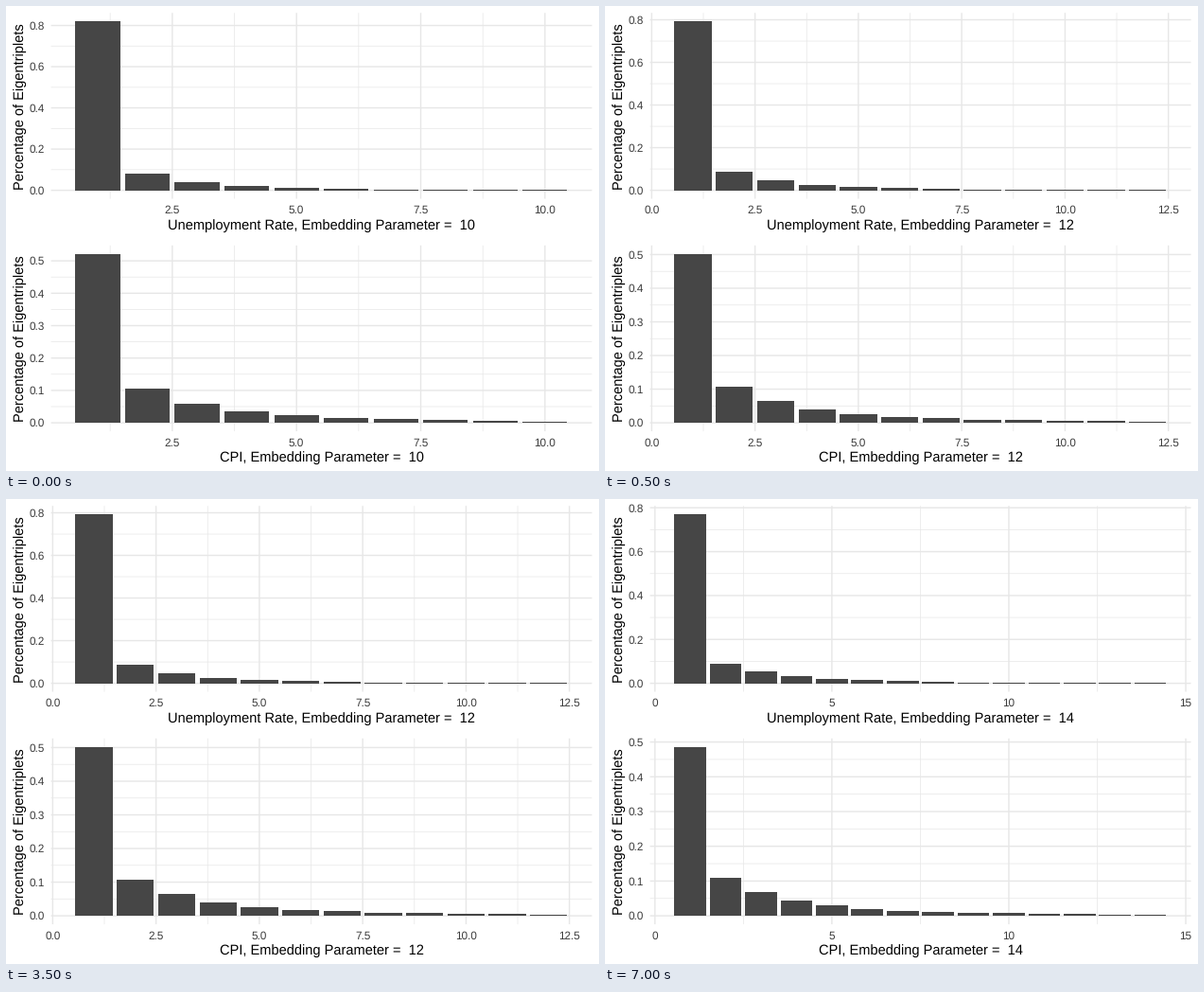
Recreate the animation shown at these times as a matplotlib script. Size 627x491 px, loop 8 s.

```python
import matplotlib
import matplotlib.pyplot as plt
import numpy as np
from matplotlib.animation import FuncAnimation
from matplotlib.patches import Rectangle

W, H, DPI = 627, 491, 64
PT = 72 / DPI                      # points per pixel
LEFT, SPAN = 73.4, 520.1           # left edge and full width of the bars
PANEL_L, PANEL_R = 47.6, 619.5
BAR_H, PAD = 178.4, 8.92           # tallest bar, panel padding
BAR, GRID, TICK = "#464646", "#e7e7e7", "#3c3c3c"

# head and second: first two shares at n = 10, each with its power of n;
# ratio: decay per bar and its rise with n; tail: slow linear part
ROWS = (
    dict(title="Unemployment Rate", base=194.6, y_step=0.2,
         head=(0.82, -0.187), second=(0.08, 0.35),
         ratio=(0.48, 0.025), tail=0.006),
    dict(title="CPI", base=440.1, y_step=0.1,
         head=(0.5217, -0.21), second=(0.105, 0.13),
         ratio=(0.52, 0.0125), tail=0.016),
)

matplotlib.rcParams.update({
    "font.family": "Liberation Sans",
    "text.hinting": "none",
    "toolbar": "None",
})

fig = plt.figure(figsize=(W / DPI, H / DPI), dpi=DPI, facecolor="white")
ax = fig.add_axes([0, 0, 1, 1])


def shares(n, row):
    """A large first share, then geometric decay over a falling line."""
    head, second = (a * (n / 10) ** p for a, p in (row["head"], row["second"]))
    ratio = row["ratio"][0] + row["ratio"][1] * (n - 10)
    i = np.arange(2, n + 1)
    tail = row["tail"] * (1 - i / (n + 3))
    rest = (second - tail[0]) * ratio ** (i - 2) + tail
    return np.append(head, rest)


def text(x, y, s, size, color, ha="center", **kw):
    ax.text(x, y, s, fontsize=size * PT, color=color, ha=ha,
            va="baseline", **kw)


def line(xs, ys, width):
    ax.plot(xs, ys, color=GRID, lw=width * PT, snap=False,
            solid_capstyle="butt", zorder=1)


def ticks(step, lo, hi):
    """Multiples of step that lie inside the panel."""
    return [k * step for k in range(int(np.ceil(lo / step)),
                                    int(np.floor(hi / step)) + 1)]


def panel(n, row):
    vals, base, y_step = shares(n, row), row["base"], row["y_step"]
    top, bottom = base - BAR_H - PAD, base + PAD
    sx, sy = SPAN / (n - 0.1), BAR_H / vals[0]

    def px(v):
        return LEFT + (v - 0.55) * sx

    def py(v):
        return base - v * sy

    x_step, fmt = (5, "{:.0f}") if n == 14 else (2.5, "{:.1f}")
    x_lo = 0.55 + (PANEL_L - LEFT) / sx
    x_hi = 0.55 + (PANEL_R - LEFT) / sx
    y_hi = vals[0] * 1.05

    # half steps get thin lines, full steps are drawn over them
    for part, width in ((0.5, 0.71), (1, 1.42)):
        for v in ticks(x_step * part, x_lo, x_hi):
            if part == 1 or round(v / x_step * 2) % 2:
                line([px(v)] * 2, [top, bottom], width)
        for v in ticks(y_step * part, 0, y_hi):
            if part == 1 or round(v / y_step * 2) % 2:
                line([PANEL_L, PANEL_R], [py(v)] * 2, width)

    y1 = round(base)
    for i, share in enumerate(vals, 1):
        x0, x1 = round(px(i - 0.45)), round(px(i + 0.45))
        y0 = min(round(py(share)), y1 - 1)
        ax.add_patch(Rectangle((x0, y0), x1 - x0, y1 - y0,
                               fc=BAR, lw=0, zorder=3))

    for v in ticks(x_step, x_lo, x_hi):
        text(px(v), bottom + 15.7, fmt.format(v), 11.73, TICK)
    for v in ticks(y_step, 0, y_hi):
        text(41, py(v) + 4.2, f"{v:.1f}", 11.73, TICK, ha="right")

    text(333.6, bottom + 32.2,
         f"{row['title']}, Embedding Parameter =  {n}", 14.67, "black")
    text(18.6, (top + bottom) / 2 + 0.6, "Percentage of Eigentriplets",
         14.67, "black", rotation=90, rotation_mode="anchor")


def draw(frame):
    ax.clear()
    ax.set_xlim(0, W)
    ax.set_ylim(H, 0)
    ax.axis("off")
    n = 10 if frame < 1 else 12 if frame < 11 else 14
    for row in ROWS:
        panel(n, row)
    return []


anim = FuncAnimation(fig, draw, frames=16, interval=500,
                     init_func=lambda: draw(0), repeat=True, repeat_delay=0)
plt.show()
```
